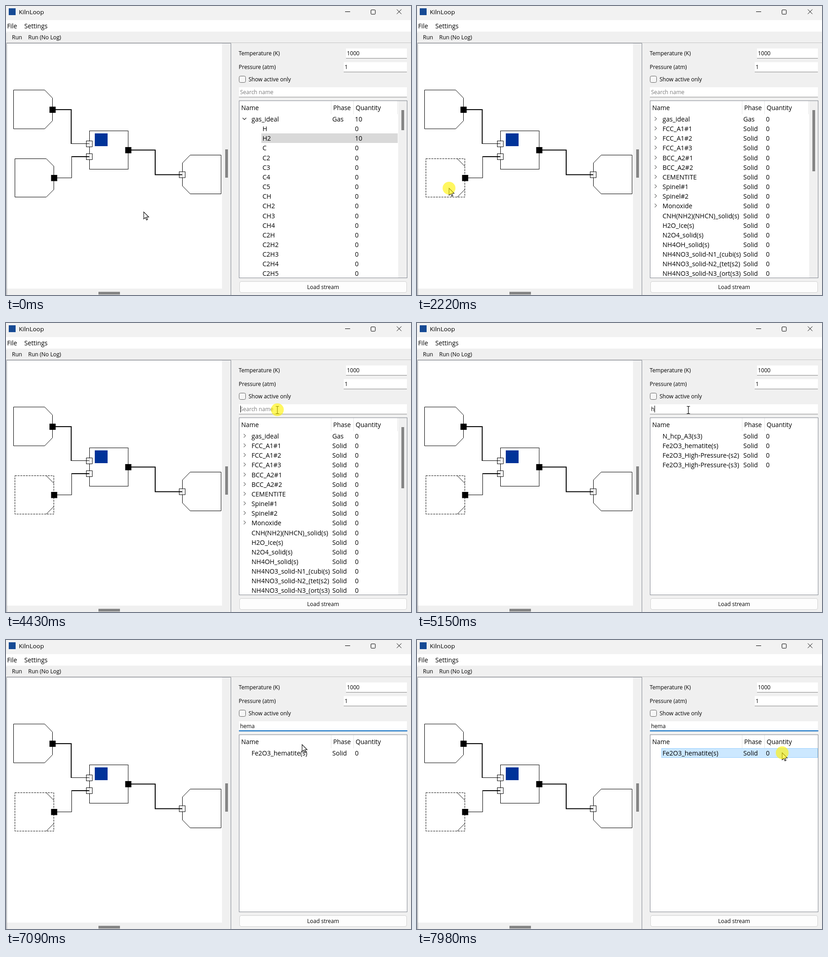
These frames come from a looping animation (885 by 633 pixels, 8000 ms). An HTML page:

```html
<!DOCTYPE html>
<html lang="en">
<head>
<meta charset="utf-8">
<title>KilnLoop</title>
<style>
html, body { margin: 0; width: 100%; height: 100%; overflow: hidden; background: #f0f0f0; }
svg { display: block; width: 100%; height: 100%; }
text { font-family: "Open Sans", "Noto Sans", sans-serif; font-size: 13.7px; fill: #000; white-space: pre; }
.small { font-size: 12px; }
.cell { font-size: 14px; }
.ink { fill: none; stroke: #000; }
.thick { stroke-width: 2; }
.white { fill: #fff; }
.panel { fill: #f0f0f0; }
.thumb { fill: #858585; }
.frame { fill: none; stroke: #828790; }
</style>
</head>
<body>
<svg id="stage" viewBox="0 0 885 633"></svg>
<script>
const LOOP = 8000, STEP = 70, ROW = 21.15;
const stage = document.getElementById("stage");

const rect = (x, y, w, h, cls = "", more = "") =>
  `<rect x="${x}" y="${y}" width="${w}" height="${h}" class="${cls}" ${more}/>`;
const path = (d, cls = "ink", more = "") => `<path d="${d}" class="${cls}" ${more}/>`;
const text = (x, y, s, cls = "", more = "") => `<text x="${x}" y="${y}" class="${cls}" ${more}>${s}</text>`;
const group = (id, body) => `<g id="${id}">${body}</g>`;
const outPort = (x, y) => rect(x - 6.5, y - 6.5, 13.5, 13.5);
const inPort = (x, y) => rect(x - 6.5, y - 6.5, 13, 13, "white", 'stroke="#000"');

// A row is "name|phase|quantity|arrow"; arrow is ">" (closed) or "v" (open).
function row(entry, i, indent = 0) {
  const [name, phase, quantity, arrow] = entry.split("|");
  const y = 253 + i * ROW, mid = Math.round(y - 6);
  const chevron = { ">": `M519.5 ${mid - 4}l4 4-4 4`, v: `M517 ${mid - 2}l4 4 4-4` }[arrow];
  return text(536.5 + indent, y, name, "cell") + text(713, y, phase, "cell") + text(762.5, y, quantity, "cell") +
    (chevron ? path(chevron, "ink", `style="stroke:${arrow === "v" ? "#222" : "#777"};stroke-width:1.2"`) : "");
}

const scrollbar = h => rect(857, 208, 19, 387, "panel") + rect(864, 228, 6, h, "thumb") +
  path("M855.5 208V237", "", 'stroke="#e5e5e5"');

const gases = "H H2 C C2 C3 C4 C5 CH CH2 CH3 CH4 C2H C2H2 C2H3 C2H4 C2H5".split(" ");
const solutions = "FCC_A1#1 FCC_A1#2 FCC_A1#3 BCC_A2#1 BCC_A2#2 CEMENTITE Spinel#1 Spinel#2 Monoxide".split(" ");
const solids = ["CNH(NH2)(NHCN)_solid(s)", "H2O_Ice(s)", "N2O4_solid(s)", "NH4OH_solid(s)",
  "NH4NO3_solid-N1_(cubi(s)", "NH4NO3_solid-N2_(tet(s2)", "NH4NO3_solid-N3_(ort(s3)"];
const matches = ["N_hcp_A3(s3)", "Fe2O3_hematite(s)", "Fe2O3_High-Pressure-(s2)", "Fe2O3_High-Pressure-(s3)"];
const solidRow = (name, i) => row(`${name}|Solid|0`, i);

const lists = {
  gasList: scrollbar(44) + rect(558, 279, 298, 21, "", 'fill="#d9d9d9"') + row("gas_ideal|Gas|10|v", 0) +
    gases.map((g, i) => row(`${g}||${g === "H2" ? 10 : 0}`, i + 1, 24)).join(""),
  phaseList: scrollbar(134) + row("gas_ideal|Gas|0|>", 0) +
    solutions.map((s, i) => row(`${s}|Solid|0|>`, i + 1)).join("") +
    solids.map((s, i) => solidRow(s, i + 10)).join(""),
  matchList: matches.map(solidRow).join(""),
  singleList: solidRow(matches[1], 0),
};

const windowBar =
  rect(0, 0, 885, 31, "", 'fill="#f2f2f2"') + rect(6, 5, 15, 15, "", 'fill="#164a94"') +
  text(28, 18, "KilnLoop", "", 'style="font-size:13.5px"') +
  path("M741 12.5H752M854 7.5l10 10M864 7.5l-10 10") +
  rect(797.5, 8.5, 9.5, 9.5, "ink", 'rx="1.5"') +
  rect(0, 31, 885, 25, "white") + text(2.5, 49, "File") + text(40, 49, "Settings") +
  path("M1.5 60V78", "", 'stroke="#b5b5b5" stroke-dasharray="1 2"') +
  text(13, 73, "Run", "small") + text(48.5, 73, "Run (No Log)", "small") +
  path("M0 80.5H885", "", 'stroke="#c4c4c4"');

const canvas =
  rect(2, 82, 470, 537, "white") + path("M1.5 633V81.5H491.5V633", "frame") +
  group("slimThumb", rect(479, 314, 6, 62, "thumb")) +
  group("wideThumb", rect(477, 314, 10, 62, "thumb", 'rx="1.5"') +
    path("M476.5 96h10l-5-8zM476.5 605h10l-5 8z", "thumb")) +
  rect(202, 626, 47, 6, "thumb") +
  path("M16.5 184H84.5L101.5 201.5V251.5L84.5 269H16.5Z") +
  group("plainBlock", path("M19.5 334.5H88L104.5 351V402L88 418.5H19.5Z")) +
  group("pickedBlock", rect(19.5, 334.5, 85, 84, "ink", 'stroke-dasharray="4 2"') +
    path("M88 334.5L104.5 351M104.5 402L88 418.5")) +
  rect(182.5, 273.5, 84.5, 84, "ink") + rect(194, 279, 28, 28, "", 'fill="#003399"') +
  path("M402.5 326.5H470V411.5H402.5L385.5 394V344Z") +
  inPort(182, 302) + inPort(182, 330) + inPort(385, 369.5) +
  path("M182.5 295V308M182.5 323V336M385.5 363V376", "ink", 'stroke-opacity=".25"') +
  path("M102 227H142.5V302", "ink thick") + path("M142 301.5H182") +
  path("M105 376.5H143.5V330") + path("M143 330H182", "ink thick") +
  path("M267 315.5H326V369.5H385", "ink thick") +
  outPort(101.5, 227) + outPort(105, 376.5) + outPort(267, 315.5);

const field = (x, y, s) => rect(x, y, 876 - x, 21, "white") + rect(x, y + 21, 876 - x, 1, "", 'fill="#868686"') +
  text(x + 2, y + 15, s, "small");

const sidebar =
  text(508.5, 108, "Temperature (K)", "small") + field(743, 93, "1000") +
  text(508.5, 138, "Pressure (atm)", "small") + field(738, 123, "1") +
  rect(509.5, 153.5, 14, 14, "", 'rx="3" fill="#f6f6f6" stroke="#626262"') +
  text(530, 165, "Show active only", "small") +
  field(509, 178, "") + text(511.5, 193, "", "small", 'id="query"') +
  rect(512, 181, 1, 15, "", 'id="caret"') +
  rect(509, 198, 368, 2, "", 'id="focusLine" fill="#0067c0"') +
  rect(509.5, 207.5, 367, 388, "white") +
  rect(534.5, 237.5, 341, 20, "", 'id="rowGlow"') +
  path("M710.5 208V237M759.5 208V237", "", 'stroke="#e5e5e5"') +
  `<clipPath id="listClip">${rect(510, 208, 366, 387)}</clipPath><g clip-path="url(#listClip)">` +
  Object.entries(lists).map(([id, body]) => group(id, body)).join("") + "</g>" +
  text(514, 228, "Name") + text(715, 228, "Phase") + text(764, 228, "Quantity") +
  rect(509.5, 207.5, 367, 388, "frame") +
  rect(510.5, 603.5, 365, 24, "", 'rx="3.5" fill="#fdfdfd" stroke="#d2d2d2"') +
  text(693, 620, "Load stream", "small", 'text-anchor="middle"');

const pointer =
  group("arrow", path("M0 0V15.5L3.6 12.2 6 17.7 8.4 16.7 6.1 11.3H11Z", "white", 'stroke="#000" stroke-width="1.1"')) +
  group("beam", path("M-3.5 -7.5H-1L0 -6.5 1 -7.5H3.5M0 -6.5V7.5M-3.5 8.5H-1L0 7.5 1 8.5H3.5", "ink", 'stroke-width="1.2"')) +
  '<circle id="click" r="14" fill="#fff200" fill-opacity=".62"/>';

stage.innerHTML = rect(0, 0, 885, 633, "panel") + windowBar + canvas + sidebar + group("pointer", pointer);
const el = {};
stage.querySelectorAll("[id]").forEach(node => el[node.id] = node);
const show = (id, on) => el[id].setAttribute("display", on ? "inline" : "none");
const within = (v, a, b) => v >= a && v < b;

// Pointer moves in steps, slowing down with its own power on each axis.
const legs = [
  { at: 1380, steps: 8, from: [301, 451], to: [70, 399], power: [1.2, 1.1] },
  { at: 3080, steps: 12, from: [70, 399], to: [555, 198], power: [1.7, 1.45] },
  { at: 3920, steps: 6, from: [555, 198], to: [593, 190], power: [1.6, 1.6] },
  { at: 7020, steps: 11, from: [593, 190], to: [798, 247], power: [1.52, 5.7] },
];

function pointerAt(t) {
  const leg = legs.filter(l => t >= l.at).pop();
  if (!leg) return legs[0].from;
  const p = Math.min(1, (Math.floor((t - leg.at) / STEP) + 1) / leg.steps);
  return leg.from.map((a, i) => a + (leg.to[i] - a) * (1 - (1 - p) ** leg.power[i]));
}

const keyTimes = [5150, 5350, 5750, 6080];

function draw(t) {
  const [x, y] = pointerAt(t).map(Math.round);
  const overSearch = within(x, 509, 877) && within(y, 178, 201);
  const overBar = within(x, 472, 492) && y > 82;
  el.pointer.setAttribute("transform", `translate(${x} ${y})`);
  show("beam", overSearch);
  show("arrow", !overSearch);
  show("click", within(t, 2220, 2290) || within(t, 4350, 4560) || t >= 7980);

  const picked = t >= 2220;
  show("pickedBlock", picked);
  show("plainBlock", !picked);
  show("wideThumb", overBar);
  show("slimThumb", !overBar);

  const typed = keyTimes.filter(k => t >= k).length;
  el.query.textContent = typed ? "hema".slice(0, typed) : "Search name";
  el.query.style.fill = typed ? "#000" : "#7a7a7a";
  const typedWidth = typed ? el.query.getComputedTextLength() : 0;
  el.caret.setAttribute("x", Math.floor(512 + typedWidth));
  show("caret", within(t, 4350, 4890) || within(t, 5150, 6690) || within(t, 7150, 7680));
  show("focusLine", t >= 7020);

  show("gasList", !picked);
  show("phaseList", picked && typed === 0);
  show("matchList", typed === 1);
  show("singleList", typed > 1);

  const chosen = t >= 7980;
  show("rowGlow", t >= 7020 && y >= 237);
  el.rowGlow.setAttribute("fill", chosen ? "#cce8ff" : "#e5f3ff");
  el.rowGlow.setAttribute("stroke", chosen ? "#99d1ff" : "#e5f3ff");
}

const start = performance.now();
function tick() {
  draw((performance.now() - start) % LOOP);
  requestAnimationFrame(tick);
}
tick();
</script>
</body>
</html>
```
